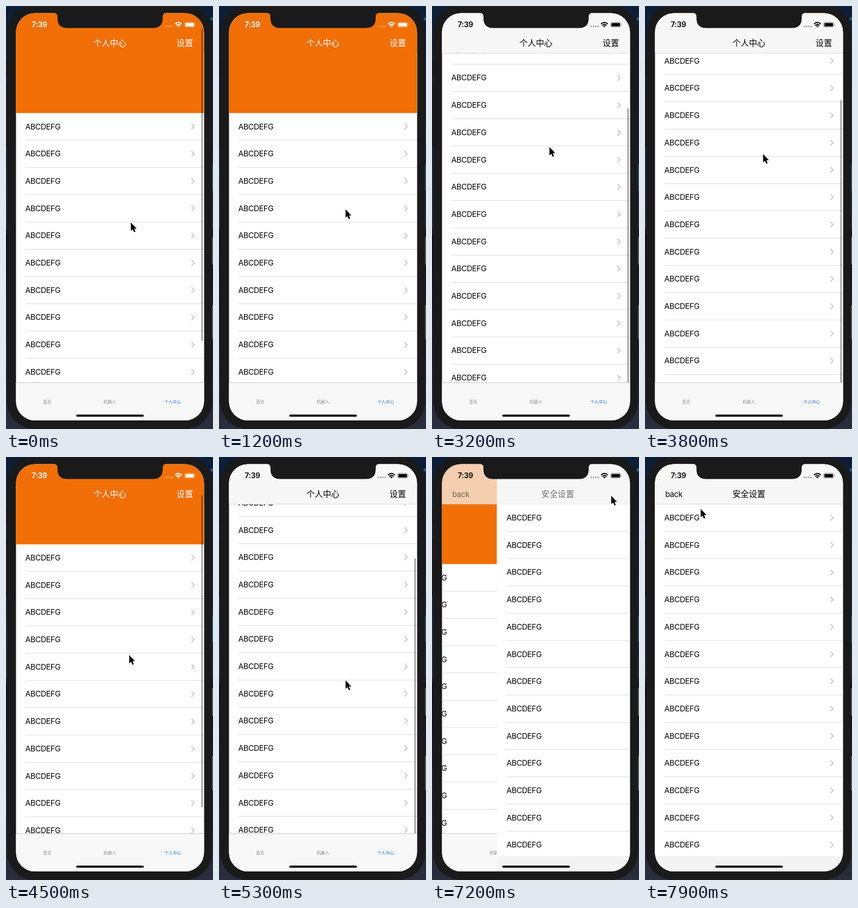
Recreate the animation shown at these times as an HTML page. Size 362 px wide and 740 px high, loop 8 s.

```html
<!DOCTYPE html>
<html lang="zh-CN">
<head>
<meta charset="utf-8">
<title>个人中心</title>
<style>
  html, body { margin: 0; width: 100%; height: 100%; overflow: hidden; background: #10141f; }
  svg { display: block; width: 362px; height: 740px; }
  text { font-family: Inter, "Noto Sans CJK SC", "Noto Sans CJK", sans-serif; }
  .row text, #back { font-size: 13.5px; letter-spacing: -.35px; }
  .row path { fill: none; stroke: #c2c2c6; stroke-width: 1.5; }
  .row line { stroke: #dcdcde; }
  .title { font-size: 14.4px; text-anchor: middle; }
  .tab { font-size: 7.3px; text-anchor: middle; fill: #8b8b8f; }
  .tab.on { fill: #147bee; }
  #time { font-size: 13px; font-weight: 600; letter-spacing: -.2px; }
</style>
</head>
<body>
<svg viewBox="0 0 362 740">
  <defs>
    <linearGradient id="desk" x2="0" y2="1">
      <stop offset="0" stop-color="#0d1d36"/>
      <stop offset=".35" stop-color="#182840"/>
      <stop offset=".52" stop-color="#28303f"/>
      <stop offset=".54" stop-color="#0c1020"/>
      <stop offset="1" stop-color="#2a2d3c"/>
    </linearGradient>
    <clipPath id="screen"><rect x="17.500" y="12.500" width="328.700" height="712.500" rx="33"/></clipPath>
    <clipPath id="list2"><rect x="17" y="82" width="330" height="616"/></clipPath>
  </defs>

  <rect width="362" height="740" fill="url(#desk)"/>
  <path d="M0 92H3V118H0ZM0 142H3V244H0Z" fill="#1b1c20"/>
  <path d="M358 20h4v5h-4zM358 278h4v46h-4z" fill="#2b5f6e"/>
  <path d="M358 404h4v48h-4zM358 523h4v60h-4z" fill="#666"/>
  <rect x="2" y="-2" width="358.500" height="742" rx="48" fill="#1a1a1b"/>

  <g clip-path="url(#screen)">
    <g id="page1">
      <rect x="17" y="12" width="330" height="714" fill="#fff"/>
      <rect id="head" x="17" y="12" width="330" fill="#f16f06"/>
      <g id="rows1"></g>
      <rect id="bar" x="341.700" width="2.400" rx="1.200"/>
      <rect x="17" y="659" width="330" height="67" fill="#f8f8f8"/>
      <path d="M17 658.800H347" stroke="#c4c4c4"/>
      <text class="tab" x="72" y="695">首页</text>
      <text class="tab" x="181.500" y="695">机器人</text>
      <text class="tab on" x="291.500" y="695">个人中心</text>
    </g>
    <g id="page2">
      <rect x="17" y="12" width="330" height="714" fill="#f3f3f3"/>
      <rect x="17" y="82" width="330" height="616" fill="#fff"/>
      <g clip-path="url(#list2)"><g id="rows2"></g></g>
    </g>
    <g id="nav">
      <rect x="17" y="12" width="330" height="70.500" fill="#f7f7f7"/>
      <path d="M17 82.500H347" stroke="#d6d6d6" stroke-width=".8"/>
    </g>
    <g id="bar1">
      <text id="title1" class="title" x="181.700" y="70.400">个人中心</text>
      <text class="title" x="312.700" y="70.400">设置</text>
    </g>
    <g id="bar2">
      <text id="title2" class="title" x="181.700" y="70.400">安全设置</text>
      <text id="back" x="35.500" y="70">back</text>
    </g>
    <g id="status">
      <text id="time" x="45" y="37">7:39</text>
      <path d="M278.500 35.700h13" fill="none" stroke="currentColor" stroke-width="3.200"
            stroke-linecap="round" stroke-dasharray="0 4" opacity=".28"/>
      <path d="M295.500 31.600Q301.500 26 307.500 31.600M297.800 34Q301.500 30.600 305.200 34"
            fill="none" stroke="currentColor" stroke-width="1.900"/>
      <path d="M299.300 35.200Q301.500 33.400 303.700 35.200L301.500 37.500Z"/>
      <rect x="312.400" y="28.400" width="17.600" height="8.600" rx="2.500" fill="none"
            stroke="currentColor" stroke-width=".8" opacity=".5"/>
      <rect x="313.700" y="29.700" width="15" height="6" rx="1.300"/>
      <path d="M331 31.200q1.400 1.500 0 3z" opacity=".6"/>
    </g>
    <rect x="123" y="714.700" width="118" height="3.900" rx="1.950"/>
  </g>

  <path fill="#1a1a1b" d="M84 12Q90 12.500 90 18.500V21.500Q90 38.500 107 38.500H257Q274 38.500 274 21.500V18.500Q274 12.500 280 12Z"/>
  <path id="cursor" d="M.4 .8V15.500L3.600 12.400L6 17.800L8.400 16.800L6.200 11.500H10.500Z"
        stroke="#fff" stroke-width="2" paint-order="stroke"/>
</svg>

<script>
const $ = id => document.getElementById(id);
const set = (id, name, v) => $(id).setAttribute(name, v);
const move = (id, x, y = 0) => set(id, 'transform', `translate(${x.toFixed(2)} ${y.toFixed(2)})`);
const clamp = v => Math.min(1, Math.max(0, v));
const ramp = (t, start, length) => clamp((t - start) / length);
const ease = u => u * u * (3 - 2 * u);

const ROW = 47.7, TOP = 187, MAX = 178.4;
const FLIP = 35, FADE = 70; // scroll where the bar starts to fill, and how long it takes

function fillRows(id, top, count) {
  $(id).innerHTML = Array.from({ length: count }, (_, i) =>
    `<g class="row" transform="translate(0 ${(top + i * ROW).toFixed(1)})">
      <text x="33.700" y="28.500">ABCDEFG</text>
      <path d="M324.400 19l4.800 4.800l-4.800 4.800"/>
      <line x1="34" x2="347" y1="${ROW}" y2="${ROW}"/>
    </g>`).join('');
}
fillRows('rows1', TOP, 15);
fillRows('rows2', 82.5, 13);

// Chain of eased moves: each is [start, length, ...goal].
const glide = (from, moves) => t => moves.reduce((at, [start, length, ...goal]) => {
  const u = ease(ramp(t, start, length));
  return at.map((v, i) => v + (goal[i] - v) * u);
}, from);

// Flick to the end with a bounce, back up, down again, then pull past the top.
const scroll = glide([0], [
  [2520, 520, MAX + 3.6], [3040, 360, MAX], [3720, 440, 0],
  [4360, 500, MAX], [5430, 620, -80], [6107, 520, 0]
]);

const pointer = glide([218, 378], [
  [100, 800, 221, 361], [1000, 200, 221, 355], [1500, 200, 234, 350], [1900, 600, 213, 358],
  [2520, 520, 205, 246], [3720, 440, 217, 384], [4360, 500, 207, 186],
  [4900, 400, 221, 390], [5430, 620, 238, 550], [6100, 300, 316, 126],
  [6400, 300, 313, 67], [7300, 600, 97, 90]
]);

function draw(t) {
  const [s] = scroll(t);
  const push = 1 - (1 - ramp(t, 7050, 450)) ** 3;
  const scrolled = s > FLIP;
  const ink = scrolled || push > .4 ? '#000' : '#fff';

  move('rows1', 0, -s);
  set('head', 'height', Math.max(0, TOP - 11.7 - s));
  set('bar', 'y', 40 + .77 * Math.max(0, s));
  set('bar', 'height', 546 + .81 * Math.min(0, s));
  set('bar', 'opacity', .4 * (1 - ramp(t, 200, 350) + ramp(t, 2520, 100) - ramp(t, 6250, 300)));

  move('page1', -98 * push);
  move('page2', 329 * (1 - push));

  set('nav', 'opacity', Math.max(clamp((s - FLIP) / FADE), push));
  set('bar1', 'fill', scrolled ? '#000' : '#fff');
  set('bar1', 'opacity', clamp(1 - push * 1.6));
  set('bar2', 'opacity', clamp(push * 1.6 - .6));
  move('title1', -110 * push);
  move('title2', 130 * (1 - push));
  set('status', 'fill', ink);
  set('status', 'color', ink);

  move('cursor', ...pointer(t));
}

const start = performance.now();
function tick() {
  draw((performance.now() - start) % 8000);
  requestAnimationFrame(tick);
}
tick();
</script>
</body>
</html>
```
